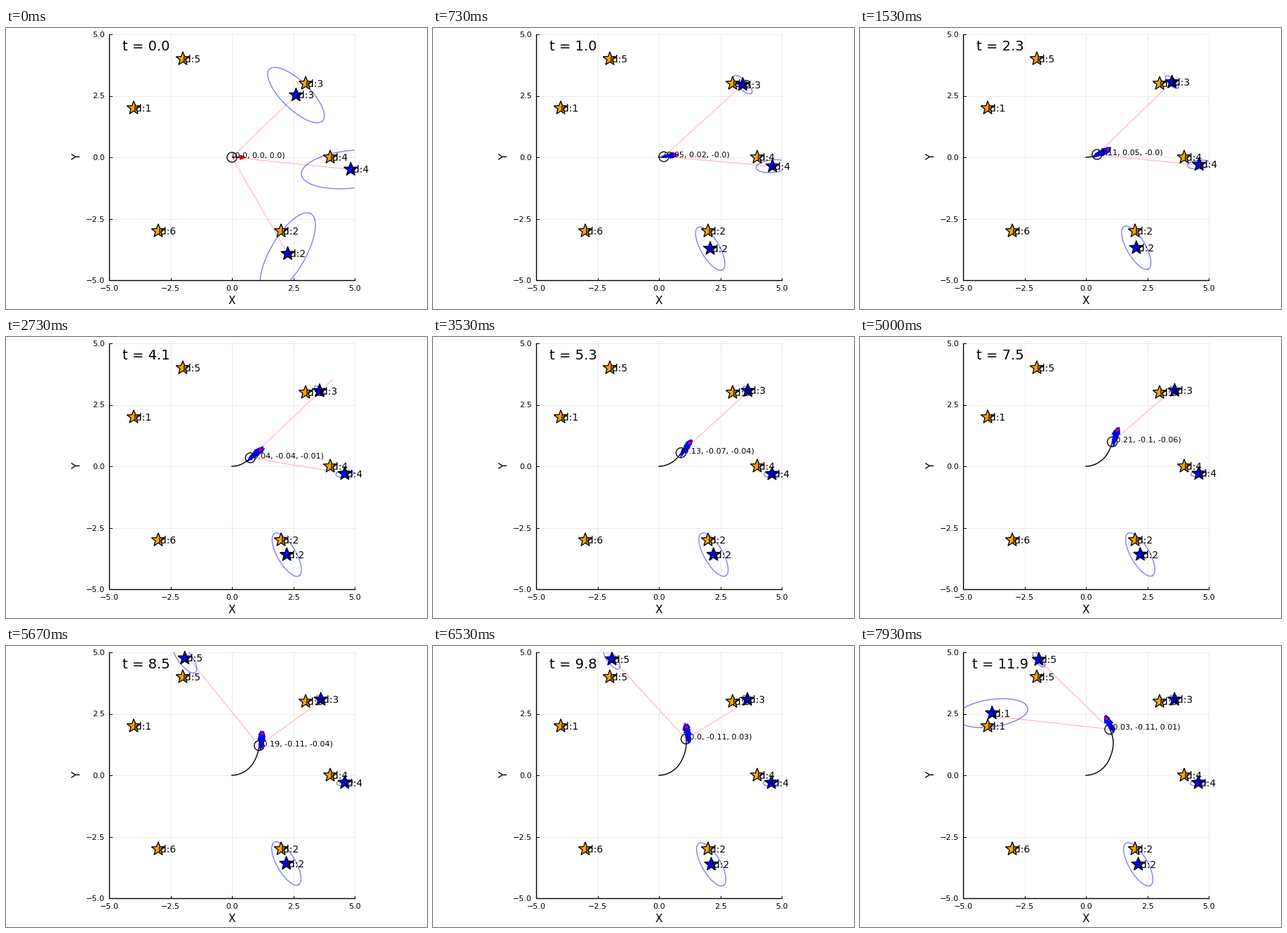
A matplotlib script for the animation above (8000 ms loop, 600x400 px).

```python
import numpy as np
import matplotlib.pyplot as plt
from matplotlib.animation import FuncAnimation
from matplotlib.collections import LineCollection, PolyCollection
from matplotlib.patches import Circle, Polygon, Rectangle

W, H, DPI = 600, 400, 100
FRAMES = 120
PX = 72 / DPI                      # points per pixel
X0, Y0, UNIT = 322, 184, 35        # plot origin and scale in pixels
LEFT, RIGHT, TOP, BOTTOM = 147, 497, 9, 359
ARROW = 17.5
PARTICLES = 30
VIEW = np.radians(60.5)            # half of the field of view

plt.rcParams["font.family"] = "DejaVu Sans"
fig = plt.figure(figsize=(W / DPI, H / DPI), dpi=DPI, facecolor="white")
ax = fig.add_axes([0, 0, 1, 1])
ax.set_xlim(0, W)
ax.set_ylim(H, 0)
ax.axis("off")
box = Rectangle((LEFT, TOP), RIGHT - LEFT, BOTTOM - TOP, transform=ax.transData)

rng = np.random.default_rng(7)
steps = np.arange(FRAMES)


def px(x, y):
    return np.array([X0 + UNIT * x, Y0 - UNIT * y])


def smooth(t):
    t = np.clip(t, 0, 1)
    return t * t * (3 - 2 * t)


def unit(angle):
    return np.array([np.cos(angle), -np.sin(angle)])


def bearing(start, end):
    dx, dy = (end - start).T
    return np.arctan2(-dy, dx)


def line(points, color, width, z, clip=False, alpha=1):
    xs, ys = np.array(points).T
    art, = ax.plot(xs, ys, color=color, lw=width * PX, zorder=z, alpha=alpha)
    if clip:
        art.set_clip_path(box)
    return art


def label(x, y, s, size, ha="left"):
    return ax.text(x, y, s, fontsize=size, ha=ha, va="baseline", zorder=10)


def star(x, y, color, z):
    a = np.pi / 2 + np.arange(10) * np.pi / 5
    r = np.where(np.arange(10) % 2, 4.2, 10.2)
    pts = np.column_stack([x + r * np.cos(a), y - r * np.sin(a)])
    return ax.add_patch(Polygon(pts, fc=color, ec="black", lw=1.3 * PX,
                                joinstyle="miter", zorder=z))


def ellipse(center, a, b, angle):
    u = np.linspace(0, 2 * np.pi, 90)[:, None]
    pts = (center + a * np.cos(u) * unit(angle)
           + b * np.sin(u) * unit(angle + np.pi / 2))
    return line(pts, "blue", 1.4, 3, True, 0.5)


def arrows(base, angle, color, z):
    """Shafts with small filled heads."""
    d, n = unit(angle).T, unit(angle + np.pi / 2).T
    tip = base + ARROW * d
    neck = tip - 6 * d
    shafts = LineCollection(np.stack([base, neck], axis=1), colors=color,
                            linewidths=1.6 * PX, zorder=z)
    heads = PolyCollection(np.stack([tip, neck + 2.6 * n, neck - 2.6 * n], axis=1),
                           facecolors=color, edgecolors=color,
                           linewidths=PX, zorder=z)
    return [ax.add_collection(shafts), ax.add_collection(heads)]


# robot: 0.2 m/s at 10 deg/s, with a slow drift off the circle
heading = np.radians(steps)
radius = 0.2 / np.radians(10)
robot = px(radius * np.sin(heading), radius * (1 - np.cos(heading))).T
robot += np.outer(smooth((steps - 35) / 35), [-1.2, 0])
robot += np.outer(smooth(steps / 100), [0, -6])

# pose error readout
TURNS = [0, 23, 41, 66, 85, 98, 119]
ERRORS = np.array([(0, 0, 0), (.11, .05, -.004), (.04, -.04, -.01),
                   (.22, -.1, -.07), (.19, -.11, -.04), (0, -.11, .03),
                   (.03, -.11, .01)])
error = np.column_stack([np.interp(steps, TURNS, e) for e in ERRORS.T])

# particle cloud, stretched along the heading
guess = robot + np.outer(smooth(steps / 66), [3, -1])
cloud = (0.8 * rng.normal(size=(1, PARTICLES, 3))
         + 0.5 * rng.normal(size=(FRAMES, PARTICLES, 3))).clip(-2, 2)
growth = np.minimum(1, steps / 20)


class Landmark:
    """Estimate moving from its first fix to a settled place."""

    def __init__(self, x, y, first, settled, swing=0, mirrored=True):
        self.place = px(x, y)
        self.first, self.settled = np.array(first), np.array(settled)
        if not len(first):
            return
        self.mirrored = mirrored
        off = bearing(robot, self.place) - heading
        self.seen = np.abs((off + np.pi) % (2 * np.pi) - np.pi) < VIEW
        self.count = np.cumsum(self.seen)
        self.start = int(np.argmax(self.seen))
        age = np.maximum(steps - self.start, 0)[:, None]
        self.pos = settled + (self.first - self.settled) / (1 + 0.4 * age)
        # the best particle changes twice, with small hops in between
        phase = np.select([age == 0, steps[:, None] < 30, steps[:, None] < 88],
                          [0, -1, 1], 0)
        self.pos += phase * swing * np.array([1, -0.4])
        hop = np.repeat(rng.normal(0, 0.7, (FRAMES // 3, 2)), 3, axis=0)
        self.pos += hop * np.clip(1 - steps / 90, 0, 1)[:, None] * (age > 0)
        self.size = 0.415 * np.hypot(*(self.first - robot[self.start]))
        self.angle = bearing(robot[self.start], self.first)
        noise = rng.normal(0, 1, (FRAMES, 2)) * (age > 0)
        ray = self.pos - robot
        reach = np.hypot(*ray.T) * (1 + 0.08 * noise[:, 0])
        look = bearing(robot, self.pos) + 0.02 * noise[:, 1]
        self.sensed = robot + reach[:, None] * unit(look).T

    def draw(self, i):
        x, y = self.pos[i]
        n = self.count[i]
        a = max(self.size / n ** 0.46, 8)
        mirror = self.mirrored or n == 1
        parts = [ellipse(self.pos[i], a, 0.38 * a, -self.angle if mirror else self.angle),
                 star(x, y, "blue", 5)]
        if self.seen[i]:
            parts.append(line([robot[i], self.sensed[i]], "pink", 1.4, 2, True))
        return parts


marks = [
    Landmark(-4, 2, (188, 95.8), (189, 95)),
    Landmark(2, -3, (401.5, 321.3), (396.4, 310.5), swing=3, mirrored=False),
    Landmark(3, 3, (413.3, 95.5), (449, 75.7), swing=0.7),
    Landmark(4, 0, (491.3, 201.3), (482, 194.5), swing=0.5),
    Landmark(-2, 4, (254, 8), (255, 20), mirrored=False),
    Landmark(-3, -3, (), ()),
]

# fixed scenery
for v in (-5, -2.5, 0, 2.5, 5):
    x, y = px(v, v)
    name = f"{v:.1f}".replace("-", "\u2212")
    line([(x, TOP), (x, BOTTOM)], "black", 1, 0, alpha=0.08)
    line([(LEFT, y), (RIGHT, y)], "black", 1, 0, alpha=0.08)
    line([(x, BOTTOM), (x, BOTTOM - 3.5)], "black", 1, 1)
    line([(LEFT, y), (LEFT + 3.5, y)], "black", 1, 1)
    label(x, 374, name, 8, "center")
    label(141, y + 4, name, 8, "right")
line([(LEFT, TOP), (LEFT, BOTTOM), (RIGHT, BOTTOM)], "black", 1.4, 1)
label(X0, 393.3, "X", 11, "center")
ax.text(101.8, 183.5, "Y", fontsize=11, ha="center", va="center", rotation=90)
for k, mark in enumerate(marks, 1):
    x, y = mark.place
    star(x, y, "orange", 4)
    label(x, y + 5, f"id:{k}", 10)

live = []


def draw(i):
    while live:
        live.pop().remove()
    live.append(label(199.5, 32.2, f"t = {i / 10:.1f}", 14, "center"))
    x, y = robot[i]
    live.append(line(robot[:i + 1], "black", 1.4, 2))
    live.append(ax.add_patch(Circle((x, y), 7, fill=False, ec="black",
                                    lw=1.3 * PX, zorder=5)))
    readout = ", ".join(str(round(float(e), 2)) for e in error[i])
    live.append(label(x, y + 0.3, f"({readout})", 8))

    for k, mark in enumerate(marks, 1):
        if len(mark.first) and i >= mark.start:
            live.extend(mark.draw(i))
            live.append(label(mark.pos[i][0], mark.pos[i][1] + 5, f"id:{k}", 10))

    h = heading[i]
    along, side, turn = cloud[i].T * growth[i]
    base = (guess[i] + 4 * np.outer(along, unit(h))
            + 1.4 * np.outer(side, unit(h + np.pi / 2)))
    live.extend(arrows(base, h + np.radians(3) * turn, "blue", 7))
    live.extend(arrows(guess[i:i + 1], heading[i:i + 1], "red", 6 if i else 8))
    tip = guess[i] + (ARROW - 1.5) * unit(h)
    live.append(ax.add_patch(Circle(tip, 2.2, fc="red", ec="none", zorder=8)))
    return live


anim = FuncAnimation(fig, draw, frames=FRAMES, interval=66.5,
                     repeat=True, repeat_delay=0, blit=False)
plt.show()
```
